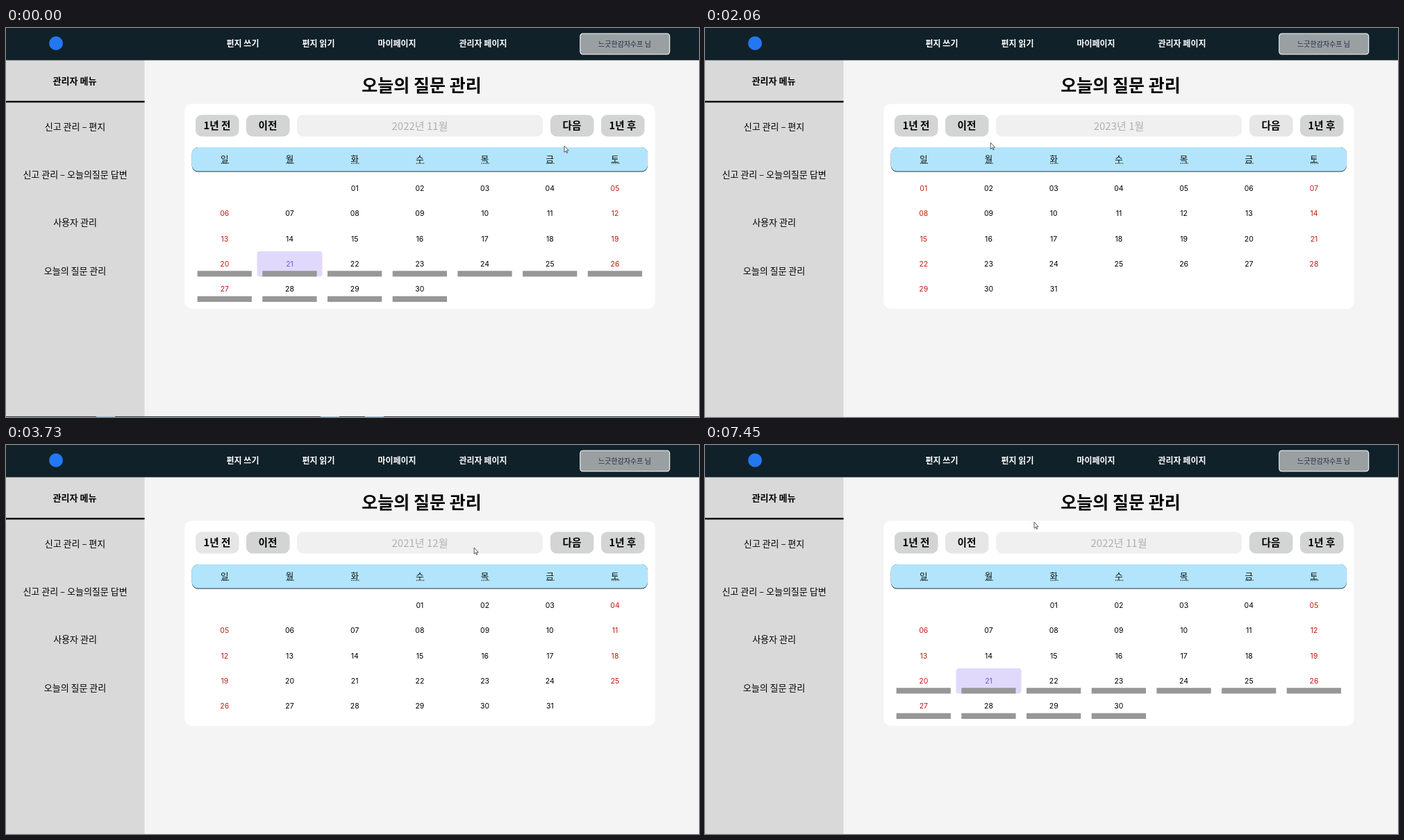
Recreate the animation shown at these times as an HTML page with a canvas. Size 998 by 561 pixels, loop 7.58 s.

```html
<!DOCTYPE html>
<html lang="ko">
<head>
<meta charset="utf-8">
<title>오늘의 질문 관리</title>
<style>
  html, body { margin: 0; width: 100%; height: 100%; overflow: hidden; background: #f4f4f4; }
  canvas { display: block; width: 998px; height: 561px; }
</style>
</head>
<body>
<canvas></canvas>
<script>
const LOOP = 7580, W = 998, H = 561;
const PRESS = 65, LOAD = 70; // click highlight and loading times in ms
const KOREAN = '"Noto Sans CJK KR", "Noto Sans CJK", sans-serif';
const canvas = document.querySelector('canvas'), ctx = canvas.getContext('2d');
const ratio = window.devicePixelRatio || 1;
canvas.width = W * ratio;
canvas.height = H * ratio;
ctx.scale(ratio, ratio);

const lastYear = { label: '1년 전', x: 273, months: -12 };
const previous = { label: '이전', x: 346, months: -1 };
const next = { label: '다음', x: 784, months: 1 };
const nextYear = { label: '1년 후', x: 857, months: 12 };
const buttons = [lastYear, previous, next, nextYear];

const easeIn = power => k => k ** power;
const easeOut = power => k => 1 - (1 - k) ** power;
const linear = easeIn(1);

const clicks = [
  { at: 655, button: next, loads: true },
  { at: 1530, button: next },
  { at: 2520, button: previous, loads: true },
  { at: 3595, button: lastYear, loads: true },
  { at: 4730, button: nextYear },
  { at: 6520, button: previous }
];

// Each pointer move starts where the one before ended; dip bends it downwards.
const START = { x: 804, y: 170 };
const moves = [
  { from: 70, to: 590, x: 814, y: 147, ease: linear, dip: 0 },
  { from: 1600, to: 2330, x: 371, y: 138, ease: easeOut(2.4), dip: 29 },
  { from: 3070, to: 3540, x: 303, y: 139, ease: linear, dip: 0 },
  { from: 3600, to: 4460, x: 893, y: 146, ease: easeOut(6), dip: 10 },
  { from: 5260, to: 6400, x: 370, y: 146, ease: easeIn(4.3), dip: 60 },
  { from: 6920, to: 7450, x: 474, y: 111, ease: linear, dip: 0 }
];

const arrow = new Path2D('M0 0V9.2L2.1 7.3L3.5 10.4L4.8 9.8L3.4 6.8H6.2Z');
const hand = new Path2D('M-1 1Q0-.8 1 1V4.6L4.6 5.5Q6 6 5.8 8L4.8 12.4H-.6L-3.6 8Q-3.4 6.4-1 7.8Z');

function rect(x, y, w, h, color, radius = 0) {
  ctx.fillStyle = color;
  ctx.beginPath();
  ctx.roundRect(x, y, w, h, radius);
  ctx.fill();
}

function disc(x, y, r, color) {
  ctx.fillStyle = color;
  ctx.beginPath();
  ctx.arc(x, y, r, 0, 7);
  ctx.fill();
}

function text(str, x, y, size, color = '#000', weight = 400, family = KOREAN) {
  ctx.font = `${weight} ${size}px ${family}`;
  ctx.fillStyle = color;
  ctx.textAlign = 'center';
  ctx.fillText(str, x, y + size * 0.37);
}

function pointer(t) {
  let { x, y } = START;
  for (const move of moves) {
    if (t < move.from) break;
    const k = Math.min(1, (t - move.from) / (move.to - move.from)), e = move.ease(k);
    x += (move.x - x) * e;
    y += (move.y - y) * e + move.dip * Math.sin(Math.PI * k);
  }
  return { x, y };
}

function drawFrame() {
  rect(0, 0, W, H, '#f4f4f4');
  rect(0, 46, 199.5, H, '#d9d9d9');
  rect(0, 105, 199.5, 2.5, '#000');
  text('관리자 메뉴', 99, 76, 13, '#000', 700);
  ['신고 관리 – 편지', '신고 관리 – 오늘의질문 답변', '사용자 관리', '오늘의 질문 관리']
    .forEach((label, i) => text(label, 99.5, 142 + i * 69.3, 13));

  rect(0, 0, W, 46.4, '#10212a');
  disc(72, 22, 10, '#2477f2');
  [['편지 쓰기', 341], ['편지 읽기', 450], ['마이페이지', 563], ['관리자 페이지', 687]]
    .forEach(([label, x]) => text(label, x, 23, 12, '#fff', 700));
  rect(826.3, 7.4, 130, 31.2, '#fff', 4.5);
  rect(827.4, 8.5, 127.8, 29, '#9a9fa2', 3.5);
  text('느긋한감자수프 님', 891, 23, 10, '#202840', 500);
  text('오늘의 질문 관리', 598.5, 83, 25, '#000', 700);
}

function drawCalendar(first, loading) {
  rect(267.7, 172, 656.4, 35.6, '#26343c', 9);
  rect(267.7, 172, 656.4, 34.6, '#b2e5fc', 9);
  const column = i => 314.8 + i * 93.7;
  [...'일월화수목금토'].forEach((day, i) => {
    text(day, column(i), 189, 12.5, '#111');
    for (let d = -5; d < 6; d += 2.5) rect(column(i) + d, 194.6, 1.2, 1.2, '#111');
  });

  const year = first.getFullYear(), month = first.getMonth();
  const today = new Date(2022, 10, 21), openFrom = new Date(2022, 10, 20), openTo = new Date(2022, 11, 3);
  const days = new Date(year, month + 1, 0).getDate();
  for (let day = 1; day <= days; day++) {
    const date = new Date(year, month, day), weekday = date.getDay();
    const row = Math.floor((first.getDay() + day - 1) / 7);
    const x = column(weekday), y = 231 + row * 36.4, isToday = +date === +today;
    if (isToday) rect(x - 47, y - 18.2, 94, 36.4, '#e1d9fb', 4);
    const color = isToday ? '#5f60d0' : weekday % 6 ? '#000' : '#c11a10';
    text(String(day).padStart(2, '0'), x, y, 10.5, color, 400, 'Inter, sans-serif');
    if (!loading && date >= openFrom && date <= openTo) rect(x - 39.2, y + 10.1, 78.3, 8.2, '#979797');
  }
}

function drawLoader() {
  rect(0, 0, W, H, 'rgba(0,0,0,.5)');
  ['#85d3fb', '#5b78ea', '#29b6f8'].forEach((color, i) => {
    const height = 56.5 + 3 * i * i;
    rect(466 + 25 * i, 280.4 - height / 2, 15.5, height, color);
  });
}

function drawPointer({ x, y }, shape, color) {
  ctx.save();
  ctx.translate(x, y);
  ctx.fillStyle = color;
  ctx.fill(shape);
  ctx.strokeStyle = '#333';
  ctx.lineWidth = 0.8;
  ctx.stroke(shape);
  ctx.restore();
}

function draw(t) {
  const click = clicks.findLast(c => c.at <= t);
  const age = click ? t - click.at : Infinity;
  const pressed = age < PRESS;
  const loading = click?.loads && !pressed && age < PRESS + LOAD;
  const shift = clicks.filter(c => c.at + PRESS <= t).reduce((sum, c) => sum + c.button.months, 0);
  const first = new Date(2022, 10 + shift, 1);
  const tip = pointer(t);
  const hovered = buttons.find(b => tip.x >= b.x && tip.x <= b.x + 62 && tip.y >= 125 && tip.y <= 156);

  drawFrame();
  rect(257.3, 109.4, 677.4, 295.6, '#fff', 10);
  for (const b of buttons) {
    rect(b.x, 125.2, 62.5, 31.2, b === hovered || b === click?.button ? '#e6e6e6' : '#d3d4d4', 9);
    text(b.label, b.x + 31, 141, 14.6, '#000', 700);
  }
  rect(419, 125.2, 354, 31.2, '#f0f0f0', 9);
  text(`${first.getFullYear()}년 ${first.getMonth() + 1}월`, 596, 141, 15, '#b0b0b0');
  drawCalendar(first, loading);

  if (!click) {
    rect(0, 560, W, 1, '#3a4248');
    for (const x of [130, 453, 517]) rect(x, 560, 27, 1, '#9cc8e0');
  }
  if (loading) drawLoader();
  if (pressed) {
    ctx.globalCompositeOperation = 'multiply';
    disc(tip.x, tip.y + 2, 8, '#f8f04a');
    ctx.globalCompositeOperation = 'source-over';
  }
  drawPointer(tip, hovered && !loading ? hand : arrow, loading ? '#d5f0ff' : '#fff');
}

function tick() {
  draw(performance.now() % LOOP);
  requestAnimationFrame(tick);
}
tick();
</script>
</body>
</html>
```
